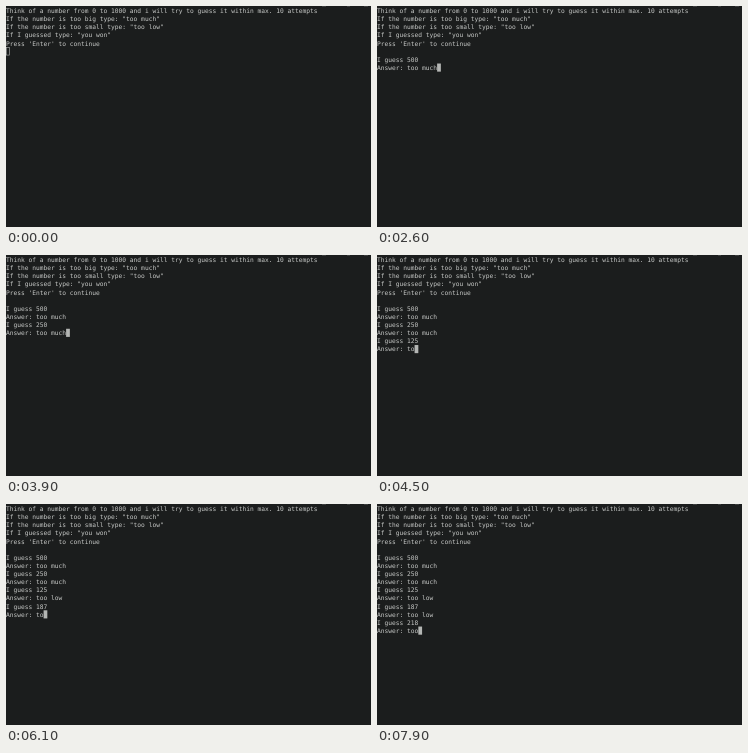
These frames come from a looping animation (365 by 221 pixels, 8 s). An HTML page:

```html
<!DOCTYPE html>
<html lang="en">
<head>
<meta charset="utf-8">
<title>Number guessing in a terminal</title>
<style>
  html, body { margin: 0; width: 100%; height: 100%; overflow: hidden; background: #1b1d1d; }
  svg { display: block; width: 365px; height: 221px; }
  text {
    font: 6.24px "DejaVu Sans Mono", monospace;
    fill: #c8cac8;
    white-space: pre;
    text-rendering: geometricPrecision;
  }
</style>
</head>
<body>
<svg viewBox="0 0 365 221">
  <path d="M316 .4h4M341 .4h3M358 .4h4" stroke="#4a4c4c" stroke-width=".8"/>
  <g id="screen"></g>
  <rect id="cursor"/>
</svg>
<script>
const LOOP = 8000;
const CELL = { w: 3.757, h: 8.13, top: 0.6, baseline: 6.4 };
const CURSOR_COLOR = '#b4b6b4';

const intro = [
  'Think of a number from 0 to 1000 and i will try to guess it within max. 10 attempts',
  'If the number is too big type: "too much"',
  'If the number is too small type: "too low"',
  'If I guessed type: "you won"',
  "Press 'Enter' to continue",
];

// Each round: start time, guess, then [time, characters typed so far]
const rounds = [
  { at: 1200, guess: 500, answer: 'too much',
    keys: [[1800, 2], [2000, 3], [2100, 4], [2300, 5], [2400, 6], [2500, 7], [2600, 8]] },
  { at: 2800, guess: 250, answer: 'too much',
    keys: [[3200, 2], [3300, 3], [3400, 4], [3600, 5], [3700, 6], [3800, 7], [3900, 8]] },
  { at: 4100, guess: 125, answer: 'too low',
    keys: [[4400, 1], [4500, 2], [4600, 3], [4700, 4], [5000, 6], [5200, 7]] },
  { at: 5300, guess: 187, answer: 'too low',
    keys: [[5900, 1], [6100, 2], [6300, 3], [6400, 4], [6700, 6], [7000, 7]] },
  { at: 7100, guess: 218, answer: 'too low',
    keys: [[7700, 1], [7800, 2], [7900, 3]] },
];

const screen = document.getElementById('screen');
const cursor = document.getElementById('cursor');

const rows = Array.from({ length: 16 }, (_, i) => {
  const row = document.createElementNS('http://www.w3.org/2000/svg', 'text');
  row.setAttribute('x', 0);
  row.setAttribute('y', CELL.top + i * CELL.h + CELL.baseline);
  screen.append(row);
  return row;
});

function setAttrs(el, attrs) {
  for (const name in attrs) el.setAttribute(name, attrs[name]);
}

function linesAt(t) {
  const lines = [...intro, ''];
  for (const { at, guess, answer, keys } of rounds) {
    if (t < at) break;
    const typed = keys.reduce((n, [time, count]) => (t >= time ? count : n), 0);
    lines.push(`I guess ${guess}`, `Answer: ${answer.slice(0, typed)}`);
  }
  return lines;
}

function drawCursor(t, lines) {
  const hollow = t < 100;
  const hidden = t >= 600 && t < 1200;
  const inset = hollow ? 0.3 : 0;
  setAttrs(cursor, {
    x: lines.at(-1).length * CELL.w + inset,
    y: CELL.top + (lines.length - 1) * CELL.h + inset,
    width: CELL.w - 2 * inset,
    height: CELL.h - 2 * inset,
    fill: hollow ? 'none' : CURSOR_COLOR,
    stroke: hollow ? CURSOR_COLOR : 'none',
    'stroke-width': 0.6,
    visibility: hidden ? 'hidden' : 'visible',
  });
}

function draw(t) {
  const lines = linesAt(t);
  rows.forEach((row, i) => {
    const line = lines[i] || '';
    if (row.textContent !== line) row.textContent = line;
  });
  drawCursor(t, lines);
}

const start = performance.now();
function tick() {
  draw((performance.now() - start) % LOOP);
  requestAnimationFrame(tick);
}
tick();
</script>
</body>
</html>
```
